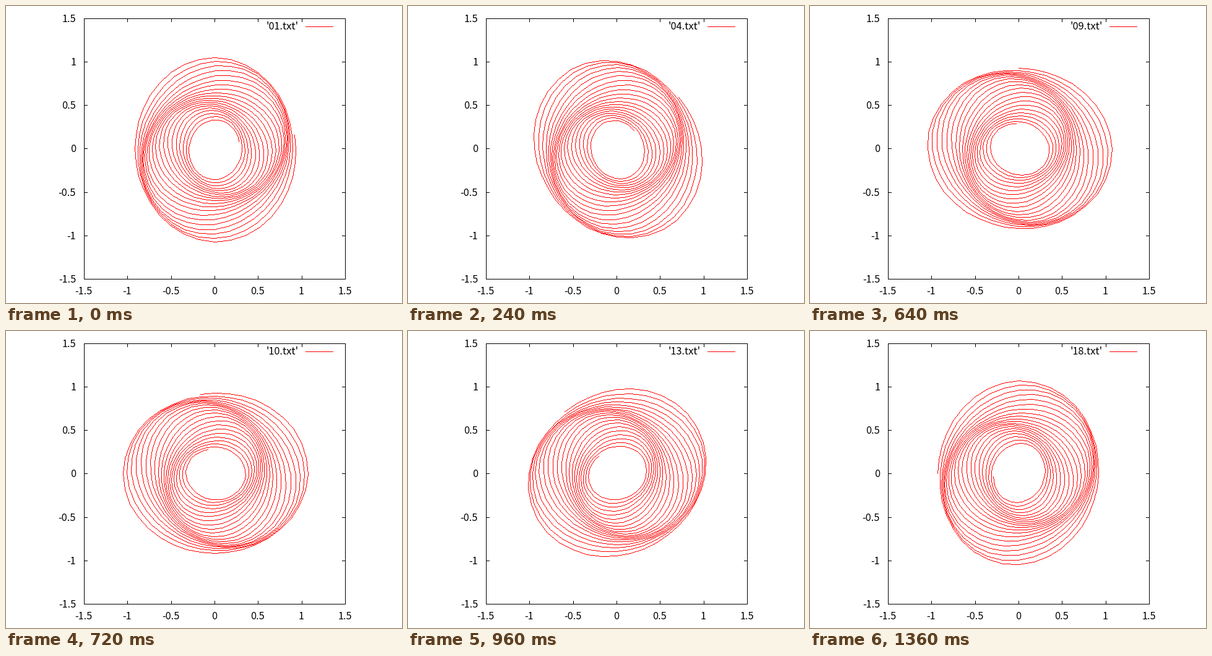
Animation, 640 px wide and 480 px high, one loop 1440 ms. Source, as a matplotlib script:

```python
import numpy as np
import matplotlib.pyplot as plt
from matplotlib.animation import FuncAnimation

W, H, DPI = 640, 480, 80
PX = 72 / DPI                       # one pixel in points
LEFT, RIGHT, TOP, BOTTOM = 126, 548, 20, 441
FRAMES, STEP_MS = 18, 80
TURNS, STEPS = 20, 36               # spiral turns, points per turn
STRETCH = 0.075
BLACK, RED = (0, 0, 0), (255, 0, 0)

plt.rcParams["font.family"] = "Noto Sans CJK JP"

fig = plt.figure(figsize=(W / DPI, H / DPI), dpi=DPI, facecolor="white")
ax = fig.add_axes([0, 0, 1, 1])
ax.axis("off")


def to_px(x, y):
    """Map data units to whole stage pixels."""
    px = LEFT + (np.asarray(x) + 1.5) / 3 * (RIGHT - LEFT)
    py = BOTTOM - (np.asarray(y) + 1.5) / 3 * (BOTTOM - TOP)
    return np.rint(px).astype(int), np.rint(py).astype(int)


def stroke(canvas, xs, ys, color):
    """Draw a polyline with a hard one-pixel pen."""
    for x0, y0, x1, y1 in zip(xs[:-1], ys[:-1], xs[1:], ys[1:]):
        n = max(abs(x1 - x0), abs(y1 - y0)) + 1
        cols = np.rint(np.linspace(x0, x1, n)).astype(int)
        rows = np.rint(np.linspace(y0, y1, n)).astype(int)
        canvas[rows, cols] = color


def label(x, y, s, ha):
    return ax.text(x, y, s, ha=ha, va="baseline", fontsize=16.3 * PX,
                   color="black")


def draw_axes(canvas):
    stroke(canvas, [LEFT, RIGHT, RIGHT, LEFT, LEFT],
           [TOP, TOP, BOTTOM, BOTTOM, TOP], BLACK)
    for v in np.arange(-1.5, 1.6, 0.5):
        x, y = to_px(v, v)
        for edge, end in ((TOP, TOP + 5), (BOTTOM, BOTTOM - 5)):
            stroke(canvas, [x, x], [edge, end], BLACK)
        for edge, end in ((LEFT, LEFT + 5), (RIGHT, RIGHT - 5)):
            stroke(canvas, [edge, end], [y, y], BLACK)
        label(x - 0.5, 466, f"{v:g}", "center")
        label(113, y + 6, f"{v:g}", "right")


# Spiral of elliptical turns whose long axis drifts about 10 degrees per turn
theta = np.radians(np.linspace(6, 360 * TURNS, STEPS * TURNS))
grow = np.linspace(0, 1, theta.size)
size = 0.304 + 0.702 * grow
axis = np.radians(67 + 200 * grow)
long, short = size * (1 + STRETCH), size * (1 - STRETCH)
radius = long * short / np.hypot(short * np.cos(theta - axis),
                                 long * np.sin(theta - axis))

base = np.full((H, W, 3), 255, dtype=np.uint8)
draw_axes(base)
stroke(base, [484, 528], [33, 33], RED)
picture = ax.imshow(base, extent=(0, W, H, 0), interpolation="nearest",
                    aspect="auto")
key = label(472.5, 38, "", "right")


def update(i):
    turn = theta + np.radians(10 * (i + 1))
    canvas = base.copy()
    stroke(canvas, *to_px(radius * np.cos(turn), radius * np.sin(turn)), RED)
    picture.set_data(canvas)
    key.set_text(f"'{i + 1:02d}.txt'")
    return picture, key


anim = FuncAnimation(fig, update, frames=FRAMES, interval=STEP_MS,
                     repeat=True, repeat_delay=0, blit=False)
plt.show()
```
